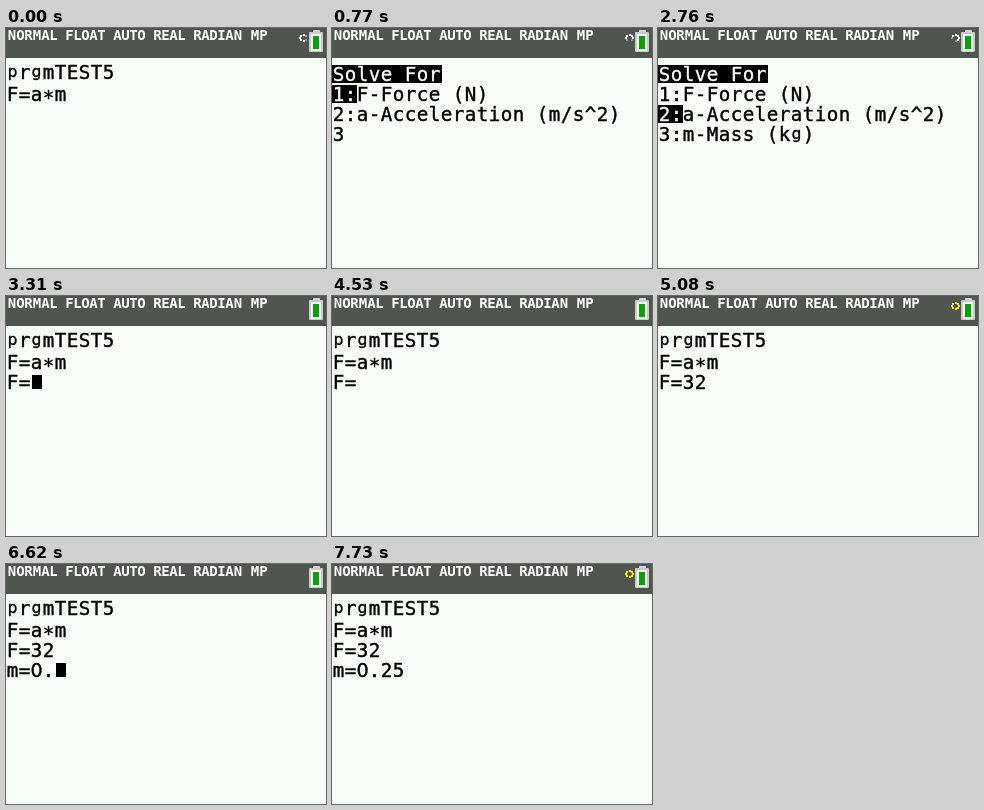
These frames come from a looping animation (320x240 px, 8 s). An HTML page:

```html
<!DOCTYPE html>
<html lang="en">
<head>
<meta charset="utf-8">
<title>Calculator program</title>
<style>
  html, body { margin: 0; width: 100%; height: 100%; overflow: hidden; background: #f8fcf8; }
  svg { display: block; width: 100vw; height: 100vh; }
  text { text-anchor: middle; white-space: pre; }
  .big { font: 19.2px "DejaVu Sans Mono", monospace; stroke-width: .4; }
  .round { font-family: "DejaVu Sans", sans-serif; }
  .low { font: 15px "DejaVu Sans", sans-serif; }
  .status { font: bold 14px "DejaVu Sans Mono", monospace; fill: #fff; }
</style>
</head>
<body>
<svg id="screen" viewBox="0 0 320 240"></svg>
<script>
const LOOP = 8000;
const INK = '#000', PAPER = '#f8fcf8';
const BASE = [51, 73, 93, 113];
const screen = document.getElementById('screen');
const timed = [];

function add(parent, tag, attrs = {}, content) {
  const node = document.createElementNS('http://www.w3.org/2000/svg', tag);
  for (const key in attrs) node.setAttribute(key, attrs[key]);
  if (content !== undefined) node.textContent = content;
  return parent.appendChild(node);
}

function rect(parent, x, y, width, height, fill, rx = 0) {
  return add(parent, 'rect', { x, y, width, height, fill, rx });
}

// A group that is visible only during the given [from, to) spans.
function during(...spans) {
  const node = add(screen, 'g');
  timed.push({ node, spans });
  return node;
}

// Large text on a grid of 12 px cells; p and g are small and sit inside the cell.
function write(parent, str, col, baseline, color = INK) {
  const line = add(parent, 'text', { class: 'big', fill: color, stroke: color });
  [...str].forEach((ch, i) => {
    const low = 'pg'.includes(ch);
    const shift = low ? -2.5 : ch === '*' ? 3 : 0;
    const attrs = { x: 6.5 + 12 * (col + i), y: baseline + shift };
    if (low) attrs.class = 'low';
    if (ch === '0') attrs.class = 'round';
    add(line, 'tspan', attrs, ch);
  });
}

function drawStatus() {
  rect(screen, 0, 0, 320, 30, '#505550');
  const str = 'NORMAL FLOAT AUTO REAL RADIAN MP';
  const xs = [];
  let x = 2;
  for (const ch of str) {
    const width = 'MN'.includes(ch) ? 9 : 8;
    xs.push(x + width / 2 - .5);
    x += width;
  }
  add(screen, 'text', { class: 'status', x: xs.join(' '), y: 12 }, str);

  rect(screen, 307, 2, 7, 4, '#d4d8d4', 1);
  rect(screen, 303, 4, 14, 20, '#c8ccc8', 1);
  rect(screen, 305, 6, 10, 17, '#f8fcf8');
  rect(screen, 307, 8, 6, 13, '#08a008');
}

function ring(parent, color, phase, levels) {
  levels.forEach((opacity, i) => {
    const a = (i + phase) * Math.PI / 4;
    const x = Math.round(296.5 + 3.5 * Math.cos(a));
    const y = Math.round(9 + 3 * Math.sin(a));
    rect(parent, x, y, 2, 2, color).setAttribute('opacity', opacity);
  });
}

function drawBusy() {
  const ticks = [0, 220, 440, 990, 1210, 1430, 1660, 1880, 2100, 2320, 2540, 2760, 2870];
  for (let i = 0; i < ticks.length - 1; i++) {
    ring(during([ticks[i], ticks[i + 1]]), '#fff', i, [0, .4, 1, 1, 1, 1, 1, .4]);
  }
  const wait = during([2870, 3310], [5080, 5520], [7730, LOOP]);
  ring(wait, '#f8f400', 0, Array(8).fill(1));
}

function drawMenu() {
  const menu = during([770, 2870]);
  rect(menu, 0, 37, 110, 18, INK);
  write(menu, 'Solve For', 0, 53, PAPER);
  write(menu, 'F-Force (N)', 2, BASE[1]);
  write(menu, 'a-Acceleration (m/s^2)', 2, BASE[2]);
  write(menu, '3', 0, BASE[3]);
  write(during([880, 2870]), ':m-Mass (kg)', 1, BASE[3]);

  const first = during([770, 2210]);
  const second = during([2210, 2870]);
  const label = (group, n, selected) => {
    if (selected) rect(group, 0, 37 + 20 * n, 25, 18, INK);
    write(group, n + ':', 0, BASE[n], selected ? PAPER : INK);
  };
  label(first, 1, true);
  label(first, 2, false);
  label(second, 1, false);
  label(second, 2, true);
}

function drawHome() {
  const home = during([0, 550], [2870, LOOP]);
  write(home, 'prgmTEST5', 0, BASE[0]);
  write(home, 'F=a*m', 0, BASE[1]);

  // time, text, column, row
  const typed = [
    [3200, 'F=', 0, 2], [4640, '3', 2, 2], [4860, '2', 3, 2],
    [5520, 'm=', 0, 3], [6290, '0', 2, 3], [6620, '.', 3, 3],
    [6950, '2', 4, 3], [7180, '5', 5, 3]
  ];
  for (const [at, str, col, row] of typed) write(during([at, LOOP]), str, col, BASE[row]);

  // from, to, column, row
  const cursors = [
    [3200, 3640, 2, 2], [4080, 4530, 2, 2], [4640, 4860, 3, 2], [4860, 5080, 4, 2],
    [5630, 6070, 2, 3], [6290, 6620, 3, 3], [6620, 6950, 4, 3],
    [6950, 7180, 5, 3], [7180, 7620, 6, 3]
  ];
  for (const [from, to, col, row] of cursors) {
    rect(during([from, to]), 2 + 12 * col, BASE[row] - 14, 10, 14, INK);
  }
}

rect(screen, 0, 0, 320, 240, PAPER);
drawStatus();
drawBusy();
drawMenu();
drawHome();

const start = performance.now();
function render() {
  const t = (performance.now() - start) % LOOP;
  for (const { node, spans } of timed) {
    const on = spans.some(([from, to]) => t >= from && t < to);
    node.style.display = on ? '' : 'none';
  }
  requestAnimationFrame(render);
}
render();
</script>
</body>
</html>
```
